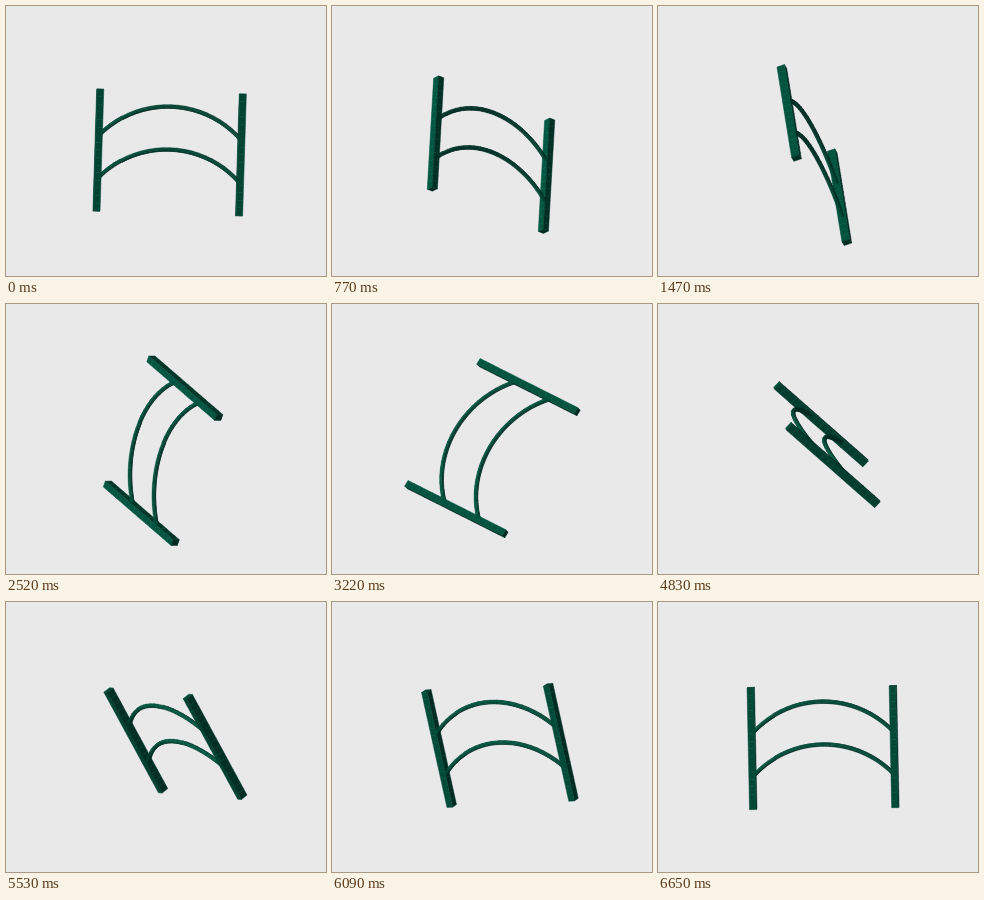
Animation, 320 px wide and 270 px high, one loop 6720 ms. Source, as an HTML page with a canvas:

```html
<!DOCTYPE html>
<html lang="en">
<head>
<meta charset="utf-8">
<title>Turning rack</title>
<style>
html, body { margin: 0; width: 100%; height: 100%; overflow: hidden; background: #e9e9e9; }
canvas { display: block; width: 320px; height: 270px; }
</style>
</head>
<body>
<canvas id="stage" width="320" height="270"></canvas>
<script>
const ctx = document.getElementById('stage').getContext('2d');

// Axes: x right, y down, z away from the viewer.
const STEP_MS = 70, STEPS = 96;
const START = 4.8, TURN = 3.66; // degrees, degrees per step
const AXIS = [-0.49, -0.84, 0.23];
const PIVOT = [163.1, 145.5];
const OFFSET = [1.1, 0.6, 7.8];
const TILT = 0.013;
const LIGHT = [-0.65, -0.3, -0.7];

const BAR = { x: 71.5, half: 61, width: 3.3, depth: 4, parts: 16 };
const ARC = { tops: [-46, -3], span: 71, radius: 97, r: 1.9, sides: 8, parts: 22 };

const faces = [];

// Sweeps a cross-section of [across, depth] corners along points in the xy plane.
function tube(points, section, capped) {
  const last = points.length - 1;
  const rings = points.map(([x, y], i) => {
    const a = points[Math.max(0, i - 1)], b = points[Math.min(last, i + 1)];
    const len = Math.hypot(b[0] - a[0], b[1] - a[1]);
    const nx = -(b[1] - a[1]) / len, ny = (b[0] - a[0]) / len;
    return section.map(([s, t]) => [x + s * nx, y + s * ny, t]);
  });
  const add = (pts, inside) => faces.push({ pts, inside });
  for (let i = 0; i < last; i++) {
    const inside = [0, 1].map(k => (points[i][k] + points[i + 1][k]) / 2).concat(0);
    for (let j = 0; j < section.length; j++) {
      const k = (j + 1) % section.length;
      add([rings[i][j], rings[i + 1][j], rings[i + 1][k], rings[i][k]], inside);
    }
  }
  if (capped) {
    add(rings[0], [...points[1], 0]);
    add(rings[last], [...points[last - 1], 0]);
  }
}

const spread = (n, fn) => Array.from({ length: n + 1 }, (_, i) => fn(i / n * 2 - 1));

const box = [[1, 1], [1, -1], [-1, -1], [-1, 1]]
  .map(([s, t]) => [s * BAR.width, t * BAR.depth]);
for (const side of [-1, 1])
  tube(spread(BAR.parts, u => [side * BAR.x, u * BAR.half]), box, true);

const round = Array.from({ length: ARC.sides }, (_, i) => {
  const a = (i + 0.5) / ARC.sides * 2 * Math.PI;
  return [ARC.r * Math.cos(a), ARC.r * Math.sin(a)];
});
const sweep = Math.asin(ARC.span / ARC.radius);
for (const top of ARC.tops)
  tube(spread(ARC.parts, u => [
    ARC.radius * Math.sin(u * sweep),
    top + ARC.radius * (1 - Math.cos(u * sweep))
  ]), round, false);

const dot = (a, b) => a[0] * b[0] + a[1] * b[1] + a[2] * b[2];
const sub = (a, b) => a.map((v, i) => v - b[i]);
const cross = (a, b) => [
  a[1] * b[2] - a[2] * b[1],
  a[2] * b[0] - a[0] * b[2],
  a[0] * b[1] - a[1] * b[0]
];

function rotate(p, angle) {
  const c = Math.cos(angle), s = Math.sin(angle);
  const k = cross(AXIS, p), d = dot(AXIS, p) * (1 - c);
  return p.map((v, i) => v * c + k[i] * s + AXIS[i] * d);
}

function place([x, y, z], angle) {
  const c = Math.cos(TILT), s = Math.sin(TILT);
  const p = [x * c - y * s + OFFSET[0], x * s + y * c + OFFSET[1], z + OFFSET[2]];
  const q = rotate(p, angle);
  return [q[0] + PIVOT[0], q[1] + PIVOT[1], q[2]];
}

function draw(step) {
  const angle = (START + TURN * step) * Math.PI / 180;
  const visible = [];
  for (const f of faces) {
    const pts = f.pts.map(p => place(p, angle));
    let n = cross(sub(pts[1], pts[0]), sub(pts[2], pts[0]));
    const len = Math.hypot(...n);
    const sign = dot(n, sub(pts[0], place(f.inside, angle))) < 0 ? -1 : 1;
    n = n.map(v => v * sign / len);
    if (n[2] >= 0) continue;
    const depth = pts.reduce((sum, p) => sum + p[2], 0) / 4;
    visible.push({ pts, depth, lit: Math.max(0, dot(n, LIGHT)) });
  }
  visible.sort((a, b) => b.depth - a.depth);

  ctx.fillStyle = '#e9e9e9';
  ctx.fillRect(0, 0, 320, 270);
  ctx.lineWidth = 0.5;
  ctx.lineJoin = 'round';
  for (const { pts, lit } of visible) {
    const g = 43 + 46 * lit ** 1.5;
    ctx.fillStyle = ctx.strokeStyle = `rgb(${g * 0.03}, ${g}, ${g * 0.75})`;
    ctx.beginPath();
    pts.forEach(p => ctx.lineTo(p[0], p[1]));
    ctx.closePath();
    ctx.fill();
    ctx.stroke();
  }
}

const begin = performance.now();
let shown = -1;
function tick() {
  const step = Math.floor(Math.max(0, performance.now() - begin) / STEP_MS) % STEPS;
  if (step !== shown) draw(shown = step);
  requestAnimationFrame(tick);
}
tick();
</script>
</body>
</html>
```
